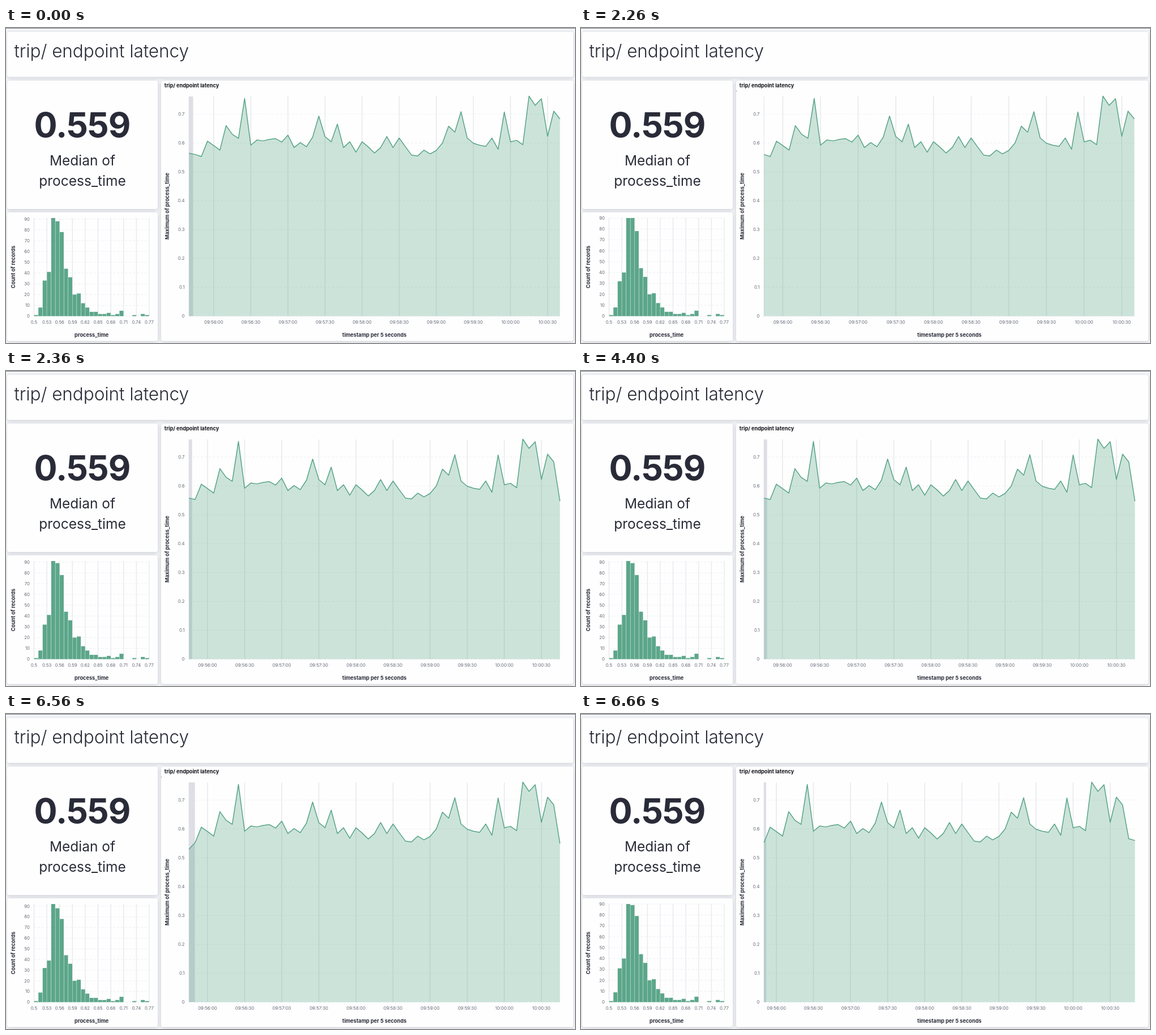
An HTML page with a canvas for the animation above (8 s loop, 1005 by 557 pixels).

```html
<!DOCTYPE html>
<html lang="en">
<head>
<meta charset="utf-8">
<title>Latency dashboard</title>
<style>
  html, body { margin: 0; width: 100%; height: 100%; overflow: hidden; background: #f4f5f8; }
  canvas { display: block; }
</style>
</head>
<body>
<canvas id="stage" width="1005" height="557"></canvas>
<script>
const ctx = document.getElementById('stage').getContext('2d');
const LOOP = 8000;
const INK = '#292b38', TICK = '#646a77', GREEN = '#57a486', GRID = '#e6e8ee';

// Latency in ms, one value per 5 s, beginning 15 s before 09:56:00 (index 3)
const LATENCY = [
  560, 553, 606, 591, 575, 660, 630, 616, 754, 592, 610, 607, 612, 615, 603,
  627, 584, 601, 587, 620, 693, 622, 604, 665, 584, 604, 568, 604, 586, 565,
  584, 622, 584, 617, 587, 558, 555, 575, 562, 574, 600, 658, 637, 708, 617,
  599, 592, 588, 617, 578, 707, 604, 609, 594, 762, 730, 753, 623, 710, 683
];
const COUNTS = [1, 8, 33, 41, 91, 88, 78, 44, 36, 20, 21, 12, 8, 4, 4, 2, 2, 3, 1, 2, 5, 0, 0, 1, 0, 2, 1];

// start: seconds relative to 09:56:00; band: width of the partial bucket
const AREAS = [
  { at: 0, start: -20, data: [564, ...LATENCY], right: 978.4, band: 7.5 },
  { at: 170, start: -15, data: LATENCY, right: 977.3, band: 0 },
  { at: 2330, start: -15, data: [558, ...LATENCY.slice(1), 547], right: 978.4, band: 5.7 },
  { at: 4470, start: -15, data: [530, ...LATENCY.slice(1), 549], right: 978.4, band: 10.7 },
  { at: 6630, start: -10, data: [...LATENCY.slice(1), 566, 560], right: 978.4, band: 4 }
];
// head replaces bars 1 to 6
const BARS = [
  { at: 0, head: [8, 33, 41, 91, 88, 78] },
  { at: 170, head: [8, 32, 40, 90, 90, 78] },
  { at: 2300, head: [8, 32, 41, 91, 89, 78] },
  { at: 4440, head: [9, 32, 39, 92, 88, 78] },
  { at: 6600, head: [9, 31, 40, 90, 89, 79] }
];
const BLINKS = [2260, 6560];

const current = (states, t) => states.filter(s => s.at <= t).pop();

function text(str, x, y, size, { weight = 400, align = 'center', color = INK, spacing = 0, turn = 0 } = {}) {
  ctx.save();
  ctx.translate(x, y);
  ctx.rotate(turn);
  ctx.font = `${weight} ${size}px Inter, sans-serif`;
  ctx.letterSpacing = spacing + 'px';
  ctx.textAlign = align;
  ctx.fillStyle = color;
  ctx.fillText(str, 0, size * 0.36);
  ctx.restore();
}

const tick = (str, x, y, align) => text(str, x, y, 7.8, { align, color: TICK });
const label = (str, x, y, turn = 0) => text(str, x, y, 9.2, { weight: 700, turn });

function line(x1, y1, x2, y2, color, width = 1, dash = []) {
  ctx.strokeStyle = color;
  ctx.lineWidth = width;
  ctx.setLineDash(dash);
  ctx.beginPath();
  ctx.moveTo(x1, y1);
  ctx.lineTo(x2, y2);
  ctx.stroke();
  ctx.setLineDash([]);
}

function panel(x, y, w, h) {
  ctx.save();
  ctx.fillStyle = '#fefefe';
  ctx.beginPath();
  ctx.roundRect(x, y, w, h, 4);
  ctx.shadowColor = 'rgba(60,70,85,0.22)';
  ctx.shadowBlur = 6;
  ctx.shadowOffsetY = 1.5;
  ctx.fill();
  ctx.restore();
}

function clock(sec) {
  const total = 9 * 3600 + 56 * 60 + sec;
  return [total / 3600, total / 60 % 60, total % 60]
    .map(n => String(Math.floor(n)).padStart(2, '0')).join(':');
}

function drawArea({ start, data, right, band }) {
  const left = 323.2, top = 121, base = 509.5;
  const step = (right - left) / (data.length - 1);
  const xAt = sec => left + (sec - start) / 5 * step;
  const yAt = ms => base - ms * 0.5105;

  for (let i = 0; i <= 7; i++) {
    const y = yAt(i * 100);
    line(left, y, right, y, '#eceef2', 1, [4, 3]);
    tick(i ? (i / 10).toFixed(1) : '0', 315.5, y, 'right');
  }
  for (let sec = 0; sec <= 270; sec += 30) {
    const x = xAt(sec);
    line(x, top, x, base, GRID, 1.5);
    tick(clock(sec), x, 520.5);
  }
  line(left, top, left, base, '#dfe2e8');
  ctx.fillStyle = '#dddee6';
  ctx.fillRect(left - 0.2, top, band, base - top);

  const curve = new Path2D();
  data.forEach((ms, i) => curve.lineTo(left + i * step, yAt(ms)));
  const fill = new Path2D(curve);
  fill.lineTo(right, base);
  fill.lineTo(left, base);
  ctx.globalAlpha = 0.3;
  ctx.fillStyle = GREEN;
  ctx.fill(fill);
  ctx.globalAlpha = 1;
  ctx.strokeStyle = GREEN;
  ctx.lineWidth = 1.5;
  ctx.lineJoin = 'round';
  ctx.stroke(curve);

  label('timestamp per 5 seconds', 650.7, 542.5);
  label('Maximum of process_time', 284.8, 315, -Math.PI / 2);
}

function drawBars({ head }) {
  const left = 49.5, right = 253, top = 336, base = 509.5;
  const counts = [COUNTS[0], ...head, ...COUNTS.slice(7)];
  const unit = (base - top) / Math.max(...counts);
  const w = (right - left) / counts.length;

  for (let n = 0; n <= 90; n += 10) {
    const y = base - n * unit;
    line(left, y, right, y, '#eceef2', 1, [4, 3]);
    tick(String(n), 42, y, 'right');
  }
  for (let i = 0; i <= 27; i += 3) {
    const x = left + i * w;
    line(x, top, x, base, GRID, 1.3);
    tick(String((50 + i) / 100), x, 520.5);
  }
  ctx.fillStyle = '#5ca68a';
  counts.forEach((n, i) => ctx.fillRect(left + i * w + 0.2, base - n * unit, w - 0.5, n * unit));

  label('process_time', 151.2, 542.5);
  label('Count of records', 12.8, 422.5, -Math.PI / 2);
}

function draw(t) {
  ctx.fillStyle = '#f4f5f8';
  ctx.fillRect(0, 0, 1005, 557);
  ctx.fillStyle = '#7b8288';
  ctx.fillRect(0, 0, 1005, 1);

  panel(2, 7, 1000, 79.5);
  panel(2, 93, 266, 227);
  panel(2, 326, 266, 227.5);
  panel(274, 93, 728, 460.5);

  text('trip/ endpoint latency', 14.5, 40.8, 31.6, { weight: 300, align: 'left', spacing: -0.1 });
  text('0.559', 134.5, 171, 61, { weight: 700, spacing: -1 });
  text('Median of', 135, 233.8, 24.5);
  text('process_time', 135, 270.6, 24.5);
  text('trip/ endpoint latency', 279.8, 101.7, 9.2, { weight: 700, align: 'left', color: '#14151c' });

  drawBars(current(BARS, t));
  drawArea(current(AREAS, t));

  if (BLINKS.some(b => t >= b && t < b + 40)) {
    ctx.fillStyle = '#555b66';
    ctx.fillRect(274, 111, 1, 1);
  }
}

let begin;
function frame(now) {
  begin ??= now;
  draw((now - begin) % LOOP);
  requestAnimationFrame(frame);
}
requestAnimationFrame(frame);
</script>
</body>
</html>
```
